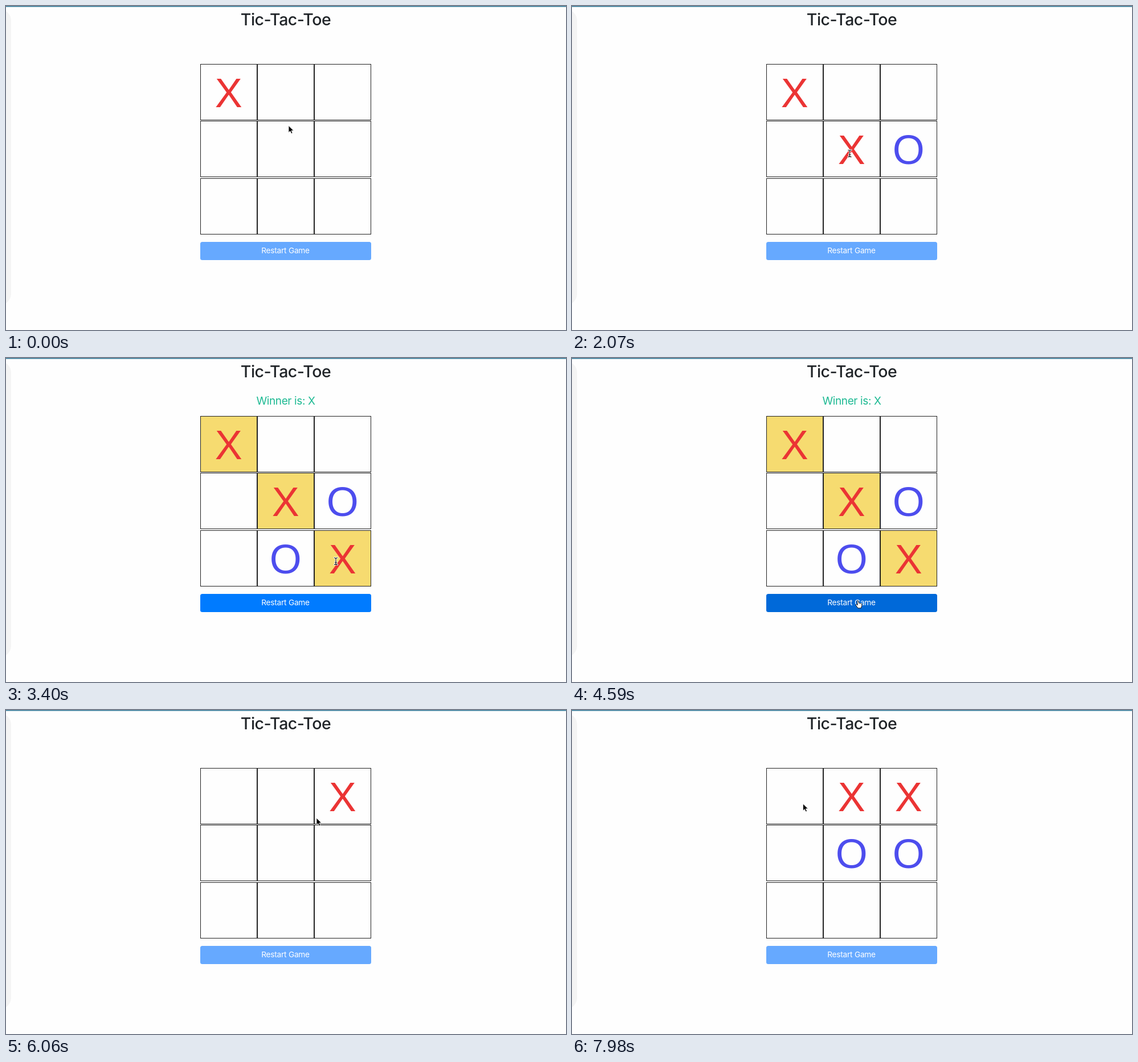
An HTML page that plays this animation: 983x570 px, repeating every 8000 ms.

```html
<!DOCTYPE html>
<html lang="en">
<head>
<meta charset="utf-8">
<title>Tic-Tac-Toe</title>
<style>
  html, body { margin: 0; width: 100%; height: 100%; overflow: hidden; background: #fefefe; }
  svg { display: block; }
  text { text-anchor: middle; font-family: Inter, "Open Sans", sans-serif; }
  .title { font-size: 28.5px; font-weight: 500; letter-spacing: -.5px; fill: #212529; }
  .winner { font-size: 19px; font-weight: 400; letter-spacing: -.4px; fill: #1cb992; }
  .label { font-size: 13.7px; letter-spacing: -.25px; fill: #fff; }
  .mark { font: 72px "Liberation Sans", Arial, sans-serif; }
  .cell { stroke: #222; fill: #fefefe; }
  .cell.win { fill: #f6db70; }
</style>
</head>
<body>
<svg width="983" height="570" viewBox="0 0 983 570">
  <rect x="-60" y="6" width="69" height="520" rx="20" fill="#f4f4f4"/>
  <rect width="983" height="1.6" fill="#3a7f9c"/>
  <text class="title" x="491" y="34">Tic-Tac-Toe</text>
  <text class="winner" id="winner" x="491" y="81.5">Winner is: X</text>
  <g id="board"></g>
  <rect id="button" x="341" y="415" width="300" height="32" rx="3.5"/>
  <text class="label" x="490.5" y="435.3">Restart Game</text>
  <g id="cursor">
    <path id="arrow" d="M0 0V12.2L2.8 9.6L4.9 14L7 13L5 8.8H8.9Z" fill="#000" stroke="#fff" stroke-width=".8"/>
    <g id="beam" fill="none" stroke-linecap="round">
      <path d="M-2.7 -6Q0 -6 0 -4V4Q0 6 -2.7 6M2.7 -6Q0 -6 0 -4V4Q0 6 2.7 6M-1.5 2H1.5" stroke="#fff" stroke-width="2.8"/>
      <path d="M-2.7 -6Q0 -6 0 -4V4Q0 6 -2.7 6M2.7 -6Q0 -6 0 -4V4Q0 6 2.7 6M-1.5 2H1.5" stroke="#111" stroke-width="1.1"/>
    </g>
    <path id="hand" d="M-2.6 -5.5Q-1.5 -7 -.4 -5.5L.8 -1.5Q2 -2.4 2.8 -1.2Q4 -1.8 4.6 -.5Q6 -.7 6 .9L5.4 4.2L4.4 7H-1L-4.6 2.2Q-5.4 .3 -3.6 .3L-1.6 1.8Z" fill="#fff" stroke="#111" stroke-linejoin="round"/>
  </g>
</svg>
<script>
const LOOP = 8000, RESTART = 4735, WIN = 3400;
const RED = '#eb3434', BLUE = '#4d4dee';
const rows = [102.5, 202.5, 303.5];
const baselines = [178, 278, 378.5];

// time, cell, mark
const moves = [
  [0, 0, 'X'], [590, 5, 'O'], [1320, 4, 'X'], [2660, 7, 'O'], [WIN, 8, 'X'],
  [5764, 2, 'X'], [6500, 4, 'O'], [6800, 1, 'X'], [7540, 5, 'O']
];

// time, x, y, pointer shape
const pointer = [
  [0, 496, 210.5, 'arrow'], [150, 515, 222, 'arrow'], [297, 548, 238, 'arrow'],
  [443, 575, 249, 'arrow'], [590, 580, 251, 'beam'],
  [880, 562, 252, 'arrow'], [1027, 522, 253, 'arrow'], [1173, 490, 252, 'arrow'],
  [1320, 487.5, 252, 'beam'], [2070, 487.5, 259.5, 'beam'],
  [2215, 484, 300, 'arrow'], [2360, 482, 327, 'arrow'], [2660, 484, 328, 'beam'],
  [2807, 525, 341, 'arrow'], [2953, 562, 354, 'arrow'], [3100, 579, 357, 'arrow'],
  [3400, 579, 357.5, 'beam'],
  [4000, 573, 366, 'beam'], [4147, 552, 390, 'arrow'], [4294, 525, 418, 'hand'],
  [4441, 506, 431, 'hand'], [4590, 503, 433, 'hand'], [4735, 503, 432, 'arrow'],
  [4880, 520, 330, 'arrow'], [5030, 549, 225, 'arrow'], [5170, 567, 199, 'arrow'],
  [5470, 574, 175, 'arrow'], [5617, 580, 156, 'arrow'], [5764, 580, 153, 'beam'],
  [5911, 574, 160, 'beam'], [6060, 545, 190, 'arrow'], [6205, 510, 226, 'arrow'],
  [6352, 490, 242, 'arrow'], [6500, 487.5, 243, 'beam'],
  [6650, 487.5, 170, 'arrow'], [6800, 487.5, 147, 'beam'],
  [6947, 505, 168, 'beam'], [7094, 538, 211, 'arrow'], [7240, 558, 236, 'arrow'],
  [7540, 558, 236, 'arrow'], [7687, 520, 222, 'arrow'], [7834, 446, 187, 'arrow'],
  [7980, 405.5, 165, 'arrow']
];

const byId = id => document.getElementById(id);
const show = (el, on) => el.setAttribute('visibility', on ? 'visible' : 'hidden');

function add(tag, attrs) {
  const el = document.createElementNS('http://www.w3.org/2000/svg', tag);
  for (const key in attrs) el.setAttribute(key, attrs[key]);
  return byId('board').appendChild(el);
}

const cells = Array.from({ length: 9 }, (_, i) => {
  const col = i % 3, row = Math.floor(i / 3);
  return {
    box: add('rect', { class: 'cell', x: 341.5 + col * 100, y: rows[row], width: 99, height: 98 }),
    mark: add('text', { class: 'mark', x: 390.7 + col * 100, y: baselines[row] })
  };
});

function draw(t) {
  const won = t >= WIN && t < RESTART;
  const start = t < RESTART ? 0 : RESTART;
  const marks = {};
  for (const [at, cell, mark] of moves) {
    if (at >= start && at <= t) marks[cell] = mark;
  }
  cells.forEach(({ box, mark }, i) => {
    mark.textContent = marks[i] || '';
    mark.setAttribute('fill', marks[i] === 'X' ? RED : BLUE);
    box.classList.toggle('win', won && i % 4 === 0);
  });

  const [, x, y, shape] = pointer.findLast(p => p[0] <= t);
  byId('cursor').setAttribute('transform', `translate(${x} ${y})`);
  for (const id of ['arrow', 'beam', 'hand']) show(byId(id), id === shape);

  show(byId('winner'), won);
  const hover = shape === 'hand';
  byId('button').setAttribute('fill', !won ? '#66a9ff' : hover ? '#0069d9' : '#007bff');
}

const begin = performance.now();
function tick() {
  draw((performance.now() - begin) % LOOP);
  requestAnimationFrame(tick);
}
tick();
</script>
</body>
</html>
```
